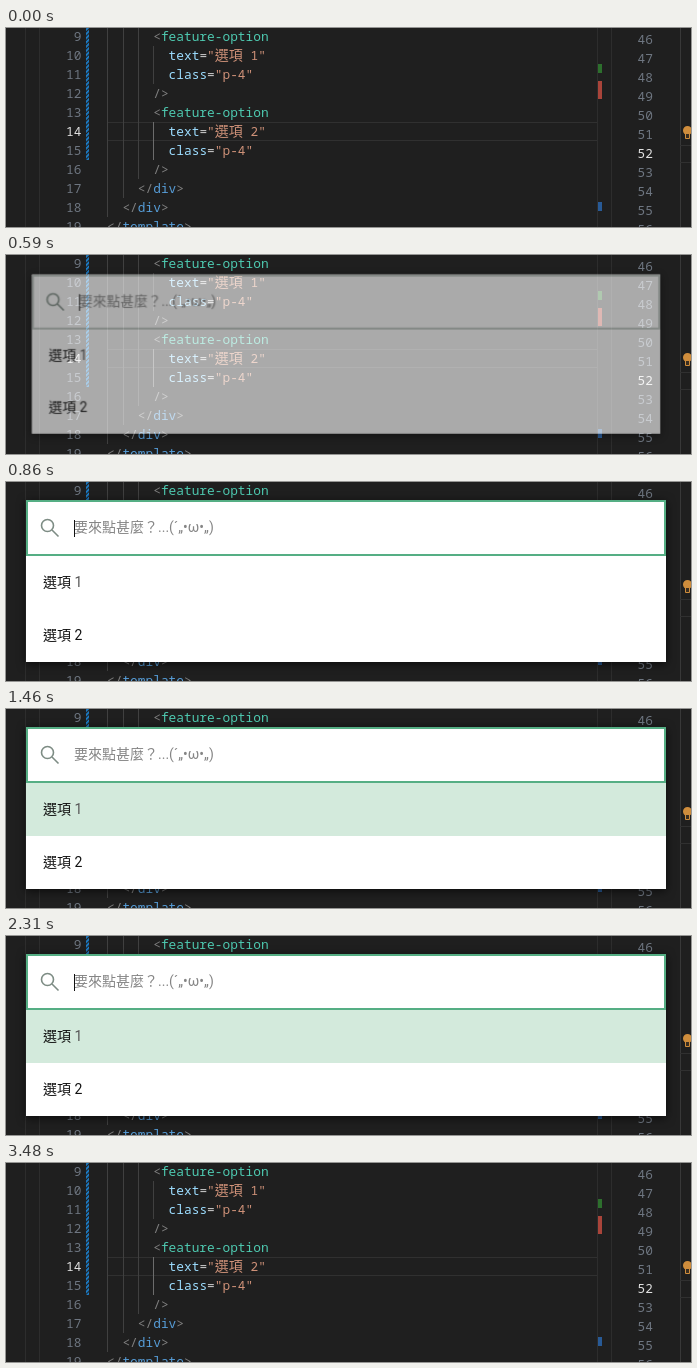
An HTML page that plays this animation: 685x199 px, repeating every 3520 ms.

```html
<!DOCTYPE html>
<html lang="zh-Hant">
<head>
<meta charset="utf-8">
<title>Launcher over editor</title>
<style>
html, body { margin: 0; width: 100%; height: 100%; overflow: hidden; background: #1f1f1f; }
svg { display: block; }
text { white-space: pre; }

.code { font: 12.83px "Noto Sans Mono", "Noto Sans CJK TC", monospace; }
.num { fill: #6e7681; text-anchor: end; }
.num.on { fill: #e0e0e0; }
.p { fill: #808080; }
.c { fill: #4ec9b0; }
.a { fill: #9cdcfe; }
.e { fill: #ccc; }
.s { fill: #ce9178; }
.t { fill: #569cd6; }
.cjk { font-size: 14px; }

.ui { font: 14px Roboto, "Noto Sans CJK TC", sans-serif; fill: #111; }
.hint { fill: #858585; }

.panel, .content, .field, .caret, .row1, .row2 { animation: 3520ms linear infinite; }
.panel { transform-origin: 340px 99px; animation-name: panel; }
.content { animation-name: content; }
.field { fill: none; stroke: #55ae84; stroke-width: 2; animation-name: field; }
.caret { animation-name: caret; animation-timing-function: step-end; }
.row1, .row2 { fill: #d3eadc; animation-timing-function: ease; }
.row1 { animation-name: row1; }
.row2 { animation-name: row2; }
.shade { filter: drop-shadow(0 2px 5px rgba(0, 0, 0, .65)); }

@keyframes panel {
  0% { opacity: 0; transform: scale(.966); animation-timing-function: step-end; }
  13.35% { opacity: .31; transform: scale(.966); animation-timing-function: ease-out; }
  24.43% { opacity: 1; transform: none; animation-timing-function: step-end; }
  96.87% { opacity: .5; transform: scale(.985); animation-timing-function: step-end; }
  98.86%, 100% { opacity: 0; transform: scale(.966); }
}
@keyframes content {
  0% { opacity: 0; animation-timing-function: step-end; }
  15.9%, 100% { opacity: 1; }
}
@keyframes field {
  0%, 15.9% { stroke: #ccc; }
  24.43%, 100% { stroke: #55ae84; }
}
@keyframes caret {
  0% { opacity: 1; }
  36.36% { opacity: 0; }
  51.42% { opacity: 1; }
  66.47% { opacity: 0; }
  81.53%, 100% { opacity: 1; }
}
@keyframes row1 {
  0%, 32.67% { opacity: 0; }
  41.19%, 45.17% { opacity: 1; }
  53.69%, 58.52% { opacity: 0; }
  67.05%, 100% { opacity: 1; }
}
@keyframes row2 {
  0%, 45.17% { opacity: 0; }
  53.69%, 58.52% { opacity: 1; }
  67.05%, 100% { opacity: 0; }
}
</style>
</head>
<body>
<svg width="685" height="199" viewBox="0 0 685 199">
  <defs>
    <pattern id="dirty" width="3" height="3" patternUnits="userSpaceOnUse" patternTransform="rotate(-45)">
      <rect width="3" height="1.8" fill="#1b81d0"/>
    </pattern>
  </defs>

  <g shape-rendering="crispEdges">
    <path d="M19.5 0V199M33.5 0V199M591.5 0V199M605.5 0V199" stroke="#2d2d2d"/>
    <path d="M674.5 0V199" stroke="#383838"/>
    <path d="M102 94.5H591M102 112.5H591M685 117.5H674M674 134.5H685" stroke="#303030"/>
    <path d="M101.5 0V189M117.5 0V170M132.5 0V151M147.5 18V56" stroke="#404040"/>
    <path d="M147.5 94V132" stroke="#6c6c6c"/>
    <path d="M592 36h4v9h-4z" fill="#2d6f2d"/>
    <path d="M592 53h4v18h-4z" fill="#a9443a"/>
    <path d="M592 174h4v9h-4z" fill="#285a96"/>
  </g>
  <rect x="80" width="3" height="132" fill="url(#dirty)"/>
  <g class="code" id="code"></g>
  <circle cx="681.5" cy="102.5" r="4.5" fill="#cf8d3c"/>
  <path d="M679.5 106v4.500h4v-4.500" fill="#3a2e20" stroke="#cf8d3c"/>

  <g class="panel">
    <rect x="20" y="18" width="640" height="162" fill="#fff"/>
    <g class="content">
      <rect class="shade" x="20" y="18" width="640" height="162" fill="#fff"/>
      <rect class="row1" x="20" y="74" width="640" height="53"/>
      <rect class="row2" x="20" y="127" width="640" height="53"/>
      <rect class="field" x="21" y="19" width="638" height="54"/>
      <g fill="none" stroke="#7d8c84" stroke-width="1.6">
        <circle cx="41.500" cy="43.500" r="6"/>
        <path d="M46 48l6.500 6.500"/>
      </g>
      <g class="ui">
        <text class="hint" x="68" y="50">要來點甚麼？...(´„•ω•„)</text>
        <text x="37" y="105">選項 <tspan fill="#555">1</tspan></text>
        <text x="37" y="158">選項 2</text>
      </g>
      <rect class="caret" x="68" y="38" width="1" height="17" fill="#111"/>
    </g>
  </g>
</svg>
<script>
const span = (cls, s) => `<tspan class="${cls}">${s}</tspan>`;
const open = span('p', '&lt;') + span('c', 'feature-option');
const attr = (name, value) => span('a', name) + span('e', '=') + span('s', `"${value}"`);
const label = n => attr('text', span('cjk', '選項') + ' ' + n);
const close = tag => span('p', '&lt;/') + span('t', tag) + span('p', '&gt;');
const end = span('p', '/&gt;');

// [indent, markup], starting at line 9
const option = n => [[6, open], [8, label(n)], [8, attr('class', 'p-4')], [6, end]];
const lines = [...option(1), ...option(2), [4, close('div')], [2, close('div')], [0, close('template')]];

const number = (n, x, y, active) =>
  `<text class="num${n === active ? ' on' : ''}" x="${x}" y="${y}">${n}</text>`;

let out = '';
lines.forEach(([indent, markup], i) => {
  const y = 13 + 19 * i;
  out += number(9 + i, 75.5, y, 14);
  out += `<text x="${101 + 7.7 * indent}" y="${y}">${markup}</text>`;
});
for (let i = 0; i < 11; i++) out += number(46 + i, 647, 16 + 19 * i, 52);
document.getElementById('code').innerHTML = out;
</script>
</body>
</html>
```
